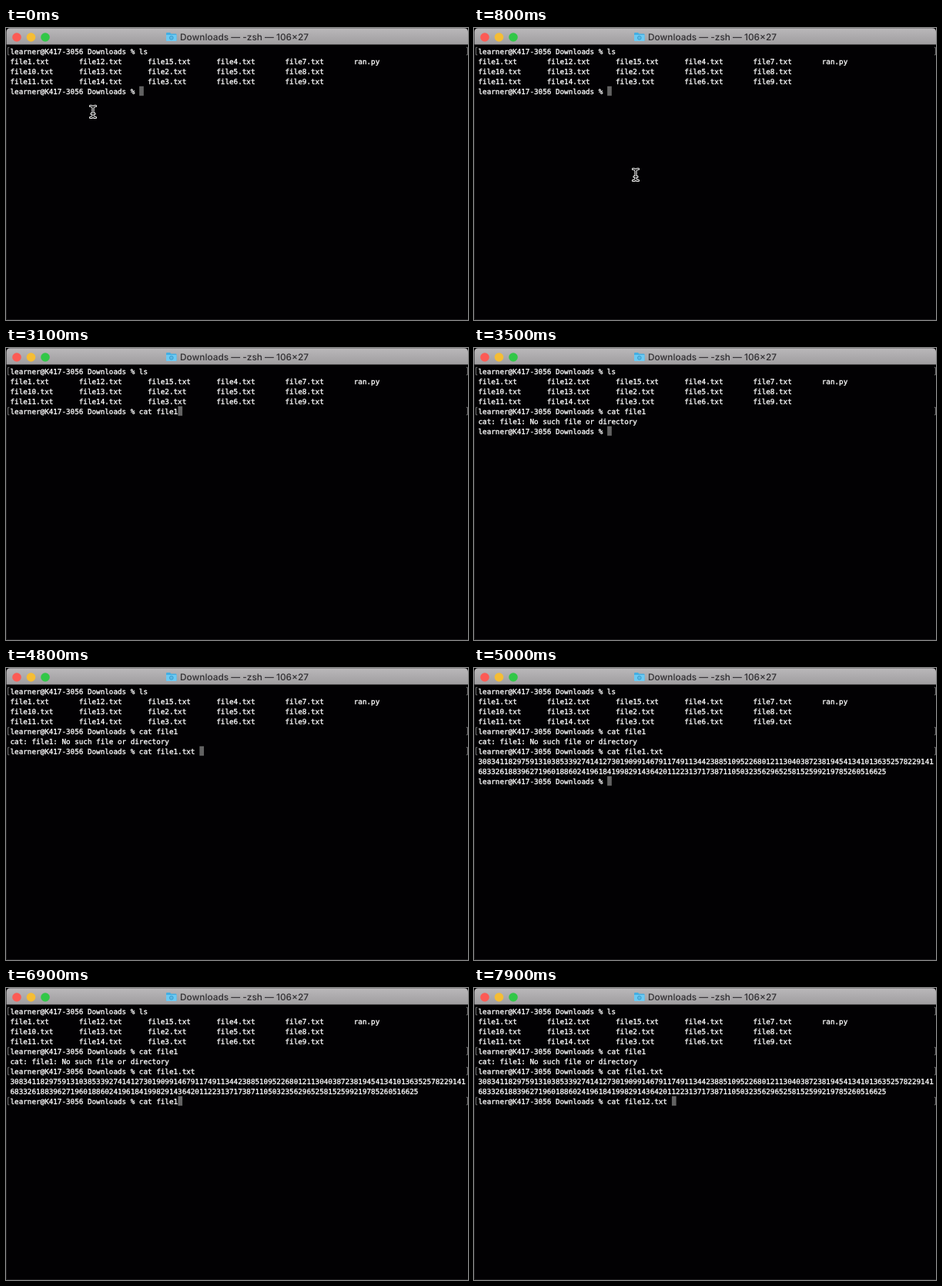
Animation of 600x380 px, one loop 8000 ms. Source, as an HTML page:

```html
<!DOCTYPE html>
<html lang="en">
<head>
<meta charset="utf-8">
<title>Terminal</title>
<style>
  html, body { margin: 0; width: 100%; height: 100%; overflow: hidden; background: #020103; }
  svg { display: block; width: 600px; height: 380px; }
  text { text-rendering: geometricPrecision; white-space: pre; }
  #title { font: 500 11.85px Inter, "Open Sans", sans-serif; fill: #2f2d30; }
  #rows text { font: 9.28px "DejaVu Sans Mono", monospace; fill: #fff; stroke: #fff; stroke-width: .32; }
  #rows path { fill: none; stroke: #858585; stroke-width: .9; }
  #beam use { fill: none; stroke-linecap: round; stroke-linejoin: round; }
</style>
</head>
<body>
<svg viewBox="0 0 600 380">
  <defs>
    <linearGradient id="bar" x2="0" y2="1">
      <stop offset="0" stop-color="#bab8ba"/>
      <stop offset="1" stop-color="#9f9d9f"/>
    </linearGradient>
    <path id="ibeam" d="M-3.5-7.5Q-.5-7.5 0-5.5Q.5-7.5 3.5-7.5M0-5.5V5.5M-3.5 7.5Q-.5 7.5 0 5.5Q.5 7.5 3.5 7.5M-2 2.5H2"/>
  </defs>
  <rect width="600" height="380" fill="#020103"/>
  <path d="M.5 22V379.5H600" fill="none" stroke="#1a191b"/>
  <path d="M.5 21.5V5Q.5 .3 5.5 .3H595Q600 .3 600 5V21.5Z" fill="url(#bar)"/>
  <circle cx="14" cy="12" r="5.8" fill="#fc5b55"/>
  <circle cx="32.5" cy="12" r="5.8" fill="#f5bd35"/>
  <circle cx="51" cy="12" r="5.8" fill="#32c748"/>
  <path d="M208 7Q208 6 209 6H213L214.5 7.5H220.5Q221.5 7.5 221.5 8.5V16Q221.5 17 220.5 17H209Q208 17 208 16Z" fill="#43aee2"/>
  <path d="M208 9H221.5V16Q221.5 17 220.5 17H209Q208 17 208 16Z" fill="#6dcaf3"/>
  <circle cx="214.8" cy="12.8" r="2.4" fill="#5bb9e6" stroke="#3793c2" stroke-width=".8"/>
  <text id="title" x="226" y="16">Downloads — -zsh — 106×27</text>

  <rect id="caret" width="5.7" height="12.4" fill="#626262"/>
  <g id="rows"></g>
  <g id="beam">
    <use href="#ibeam" stroke="#fff" stroke-width="3.2"/>
    <use href="#ibeam" stroke="#000" stroke-width="1.1"/>
  </g>
</svg>
<script>
const LOOP = 8000, TICK = 100, CELL = 5.5875, LINE = 13, LEFT = 5.5;
const PROMPT = 'learner@K417-3056 Downloads % ';
const TYPING_STARTS = 1600;

const listing = [
  'file1.txt file12.txt file15.txt file4.txt file7.txt ran.py',
  'file10.txt file13.txt file2.txt file5.txt file8.txt',
  'file11.txt file14.txt file3.txt file6.txt file9.txt'
].map(line => line.split(' ').map(name => name.padEnd(16)).join(''));

// Each event: time, then typed text, a tab completion or the printed result.
const events = [
  { at: TYPING_STARTS, type: 'c' },
  { at: 1800, type: 'a' },
  { at: 2000, type: 't' },
  { at: 2200, type: ' ' },
  { at: 2300, type: 'f' },
  { at: 2500, tab: 'ile' },
  { at: 3000, type: '1' },
  { at: 3400, print: ['cat: file1: No such file or directory'] },
  { at: 4000, type: 'cat file1' },
  { at: 4400, type: '.' },
  { at: 4600, tab: 'txt ' },
  { at: 4900, print: [
    '3083411829759131038533927414127301909914679117491134423885109522680121130403872381945413410136352578229141',
    '68332618839627196018860241961841998291436420112231371738711050323562965258152599219785260516625'
  ] },
  { at: 5600, type: 'c' },
  { at: 5700, type: 'a' },
  { at: 5900, type: 't' },
  { at: 6200, type: ' ' },
  { at: 6400, type: 'f' },
  { at: 6600, tab: 'ile' },
  { at: 6900, type: '1' },
  { at: 7100, type: '2' },
  { at: 7400, tab: '.txt ' }
];

const $ = id => document.getElementById(id);
const caret = $('caret'), beam = $('beam');

function add(tag, attrs) {
  const el = document.createElementNS('http://www.w3.org/2000/svg', tag);
  for (const key in attrs) el.setAttribute(key, attrs[key]);
  return $('rows').appendChild(el);
}

const rows = Array.from({ length: 10 }, (_, i) => {
  const y = 25.3 + i * LINE;
  return {
    text: add('text', { x: LEFT, y: 33.5 + i * LINE }),
    mark: add('path', { d: `M4.4 ${y}H2.6v9.6H4.4M597.8 ${y}H599.4v9.6H597.8` })
  };
});

function screenAt(t) {
  const lines = [
    { text: PROMPT + 'ls', mark: true },
    ...listing.map(text => ({ text })),
    { text: PROMPT }
  ];
  for (const e of events) {
    if (e.at > t) break;
    const last = lines[lines.length - 1];
    if (e.print) {
      lines.push(...e.print.map(text => ({ text })), { text: PROMPT });
    } else {
      last.text += e.type || e.tab;
      if (e.tab) last.mark = true;
    }
  }
  return lines;
}

function draw(t) {
  const lines = screenAt(t);
  rows.forEach(({ text, mark }, i) => {
    const line = lines[i] || { text: '' };
    text.textContent = line.text;
    mark.style.display = line.mark ? '' : 'none';
  });
  const last = lines.length - 1;
  caret.setAttribute('x', LEFT + lines[last].text.length * CELL);
  caret.setAttribute('y', 23.8 + last * LINE);

  const p = Math.min(t / 800, 1), ease = p * p * (3 - 2 * p);
  beam.setAttribute('transform', `translate(${113 + 97 * ease} ${109 + 82 * ease})`);
  beam.style.display = t < TYPING_STARTS ? '' : 'none';
}

const start = performance.now();
let shown = -1;
function frame() {
  const now = performance.now() - start;
  const t = Math.floor((now % LOOP) / TICK) * TICK;
  if (t !== shown) draw(shown = t);
  requestAnimationFrame(frame);
}
frame();
</script>
</body>
</html>
```
